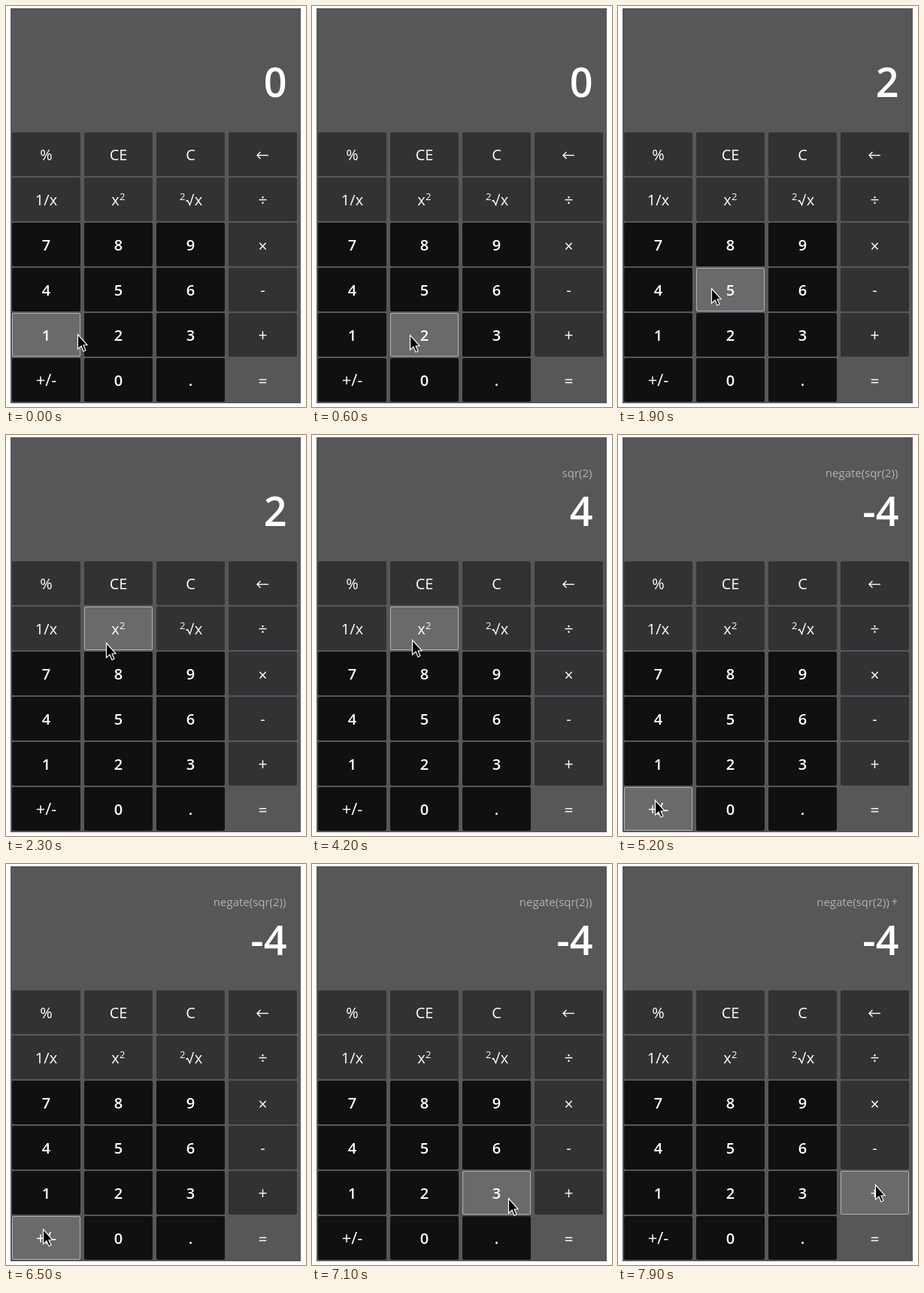
An HTML page with a canvas that plays this animation: 399 by 533 pixels, repeating every 8000 ms.

```html
<!DOCTYPE html>
<html lang="en">
<head>
<meta charset="utf-8">
<title>Calculator</title>
<style>
html, body { margin: 0; width: 100%; height: 100%; overflow: hidden; background: #fff; }
canvas { display: block; }
</style>
</head>
<body>
<canvas id="stage" width="399" height="533"></canvas>
<script>
const ctx = document.getElementById('stage').getContext('2d');
const FONT = '"Open Sans", "Noto Sans", sans-serif';
const LOOP = 8000, STEP = 100;
const KEY_W = 91, KEY_H = 58, PITCH_X = 96, PITCH_Y = 60, LEFT = 8, TOP = 168;

const ROWS = [
  ['%', 'CE', 'C', '←'],
  ['1/x', 'x²', '²√x', '÷'],
  ['7', '8', '9', '×'],
  ['4', '5', '6', '-'],
  ['1', '2', '3', '+'],
  ['+/-', '0', '.', '=']
];

// Pointer path: time, x, y
const PATH = [
  [0, 95, 436], [100, 112, 437], [200, 126, 437], [300, 130, 437],
  [1600, 130, 437], [1700, 128, 425], [1900, 124, 375], [2100, 129, 318],
  [2300, 133, 276], [2400, 133, 272], [4200, 133, 272], [4300, 127, 290],
  [4600, 65, 445], [4800, 49, 485], [6800, 49, 485], [6900, 110, 480],
  [7100, 261, 444], [7200, 315, 432], [7300, 342, 426], [LOOP, 342, 426]
];

// Display states: start time, value, expression, pending operator
const STATES = [
  [0, '0', '', ''],
  [1300, '2', '', ''],
  [3300, '4', 'sqr(2)', ''],
  [5000, '-4', 'negate(sqr(2))', ''],
  [7600, '-4', 'negate(sqr(2))', '+']
];

function text(str, x, y, size, weight = 400, align = 'center', color = '#fff') {
  ctx.font = `${weight} ${size}px ${FONT}`;
  ctx.textAlign = align;
  ctx.fillStyle = color;
  ctx.fillText(str, x, y);
}

function line(points, width) {
  ctx.beginPath();
  points.forEach(([x, y]) => ctx.lineTo(x, y));
  ctx.strokeStyle = '#fff';
  ctx.lineWidth = width;
  ctx.stroke();
}

function pointerAt(t) {
  const i = PATH.findIndex(p => p[0] > t);
  const [t0, x0, y0] = PATH[i - 1], [t1, x1, y1] = PATH[i];
  const k = (t - t0) / (t1 - t0);
  return [x0 + (x1 - x0) * k, y0 + (y1 - y0) * k];
}

function label(name, x, y) {
  const mid = x + 45.5, base = y + 37;
  switch (name) {
    case '←':
      line([[x + 38, y + 30.5], [x + 53, y + 30.5]], 1.4);
      line([[x + 42.5, y + 26], [x + 38, y + 30.5], [x + 42.5, y + 35]], 1.4);
      break;
    case 'x²':
      text('x', x + 41.5, base, 20);
      text('2', x + 50.8, y + 30, 13);
      break;
    case '²√x':
      text('2', x + 34.8, y + 30, 13);
      line([[x + 39.5, y + 31.5], [x + 41.5, y + 30.5], [x + 44.5, y + 36.5], [x + 49.5, y + 22]], 1.4);
      text('x', x + 56, base, 20);
      break;
    case '+/-': text(name, mid, base, 22); break;
    case '÷': case '=': text(name, mid, base + 1, 21); break;
    case '×': text(name, mid, base + 2, 21); break;
    case '+': text(name, mid, base, 21); break;
    default: text(name, mid, base, 20, /^[\d.]$/.test(name) ? 600 : 400);
  }
}

function key(name, col, row, px, py) {
  const x = LEFT + col * PITCH_X, y = TOP + row * PITCH_Y;
  const hover = px >= x && px < x + KEY_W && py >= y && py < y + KEY_H;
  if (hover || name !== '=') {
    const dark = row > 1 && col < 3;
    ctx.fillStyle = hover ? '#6b696c' : dark ? '#100f11' : '#333134';
    ctx.beginPath();
    ctx.roundRect(x, y, KEY_W, KEY_H, 2);
    ctx.fill();
  }
  if (hover) {
    ctx.strokeStyle = '#b4b2b5';
    ctx.lineWidth = 1;
    ctx.beginPath();
    ctx.roundRect(x + .5, y + .5, KEY_W - 1, KEY_H - 1, 1.5);
    ctx.stroke();
  }
  label(name, x, y);
}

function pointer(x, y) {
  const shape = [[0, 0], [0, 19.5], [4.5, 15.5], [7.5, 22.5], [10.5, 21], [7.5, 14.5], [12.5, 14]];
  ctx.beginPath();
  shape.forEach(([dx, dy]) => ctx.lineTo(x + dx + .5, y + dy + .5));
  ctx.closePath();
  ctx.fillStyle = '#000';
  ctx.fill();
  ctx.strokeStyle = '#fff';
  ctx.lineWidth = 1.2;
  ctx.stroke();
}

function draw(t) {
  ctx.fillStyle = '#fff';
  ctx.fillRect(0, 0, 399, 533);
  ctx.fillStyle = '#585658';
  ctx.fillRect(6, 3, 386, 525);

  const [, value, expr, op] = STATES.filter(s => s[0] <= t).pop();
  text(value, 373.5, 121, 54, 600, 'right');
  text(expr, op ? 361 : 372.5, 56, 15, 400, 'right', '#b3b1b4');
  text(op, 372.5, 56, 16, 400, 'right', '#b3b1b4');

  const [px, py] = pointerAt(t);
  ROWS.forEach((names, row) => names.forEach((name, col) => key(name, col, row, px, py)));
  pointer(px, py);
}

const start = performance.now();
function tick() {
  const t = (performance.now() - start) % LOOP;
  draw(Math.floor(t / STEP) * STEP);
  requestAnimationFrame(tick);
}
tick();
</script>
</body>
</html>
```
